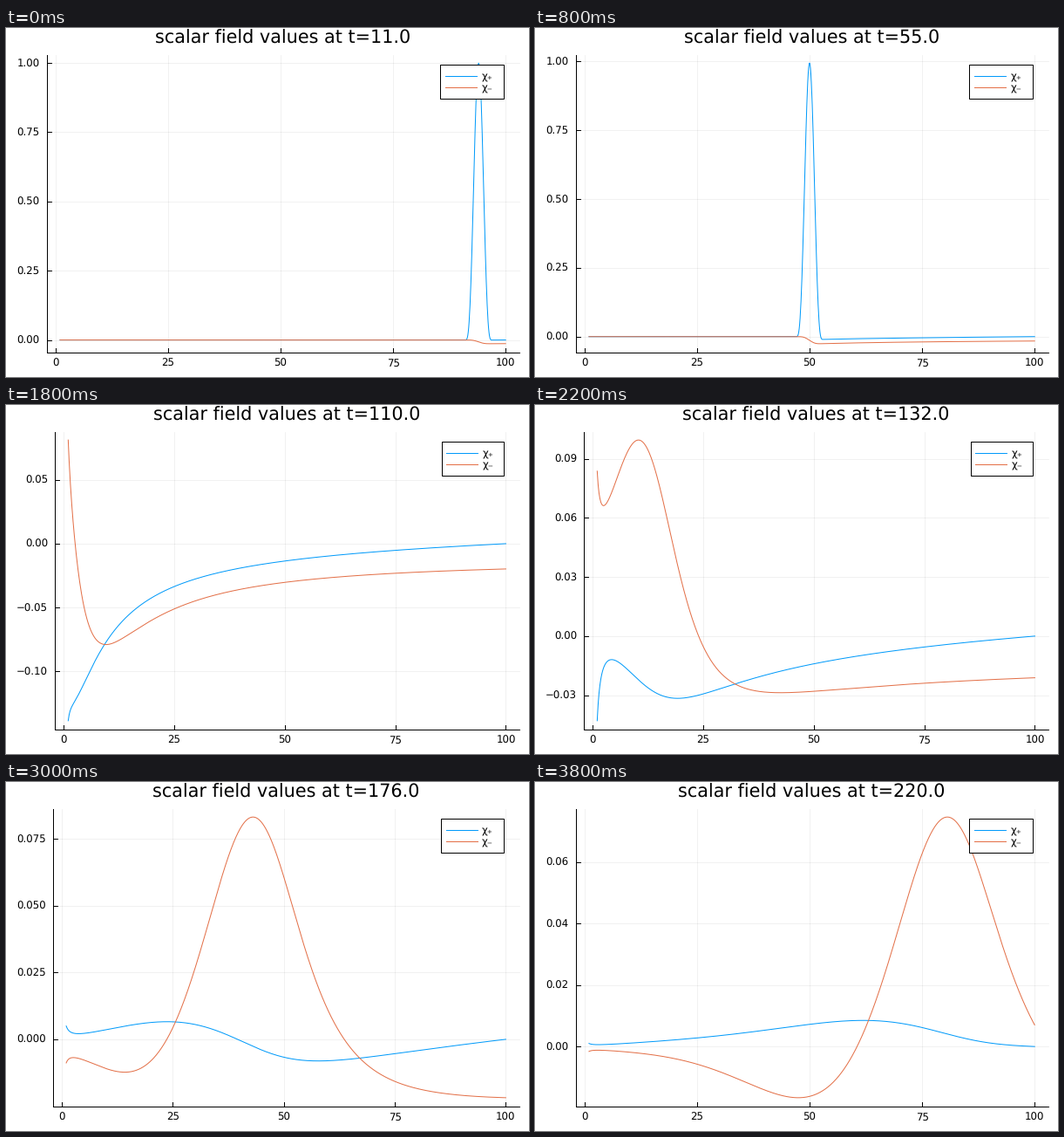
Write a matplotlib script that moves like this. It is 600 by 400 pixels and loops after 4000 ms.

```python
import math

import matplotlib.pyplot as plt
import numpy as np
from matplotlib.animation import FuncAnimation
from matplotlib.patches import Rectangle

W, H, DPI = 600, 400, 100
FRAMES, INTERVAL = 20, 200
T_STEP = 11
TOP, BOTTOM, RIGHT = 30.5, 371.5, 588.5
PAD = 0.03
BLUE = (0.0, 0.6056, 0.9787)
ORANGE = (0.8889, 0.4356, 0.2781)
PX = 72 / DPI
SMALL, LARGE = 11.8 * PX, 20.8 * PX

plt.rcParams["font.family"] = "DejaVu Sans"
plt.rcParams["text.hinting"] = "none"

# Spherical scalar wave on a black hole, marched in v = t + r.
# The enclosed mass grows outwards, from the hole to the field around it.
HOLE, CLOUD, CORE = 3.1, 2.4, 20
T_ON, T_OFF = 2, 8
R_MAX, DR, SUB = 100, 0.1, 2
r = np.linspace(1, R_MAX, 991)
soft = r ** 2 + CORE ** 2
h = HOLE / r + CLOUD * r / soft
f = 1 - h
df = HOLE / r ** 2 - CLOUD * (CORE ** 2 - r ** 2) / soft ** 2


def pulse(t):
    x = (2 * t - T_ON - T_OFF) / (T_OFF - T_ON)
    return max(0, 1 - x * x) ** 4


def incoming(v, p):
    """Ingoing field: boundary pulse plus what scatters in along constant v."""
    g = f * p / r
    area = np.zeros_like(g)
    area[1:] = np.cumsum(g[1:] + g[:-1]) * DR / 2
    return pulse(v - R_MAX) + area[-1] - area


def slope(v, p):
    dp = np.gradient(p, DR, edge_order=2)
    return -0.5 * (f * dp + incoming(v, p) / r + df * p)


def solve():
    rows = round(FRAMES * T_STEP / DR) + 1
    plus, minus = np.zeros((2, rows, r.size))
    p, dv = np.zeros_like(r), DR / SUB
    for k in range(rows):
        v = R_MAX + k * DR
        plus[k], minus[k] = incoming(v, p), (1 + h) * p
        for s in range(SUB):
            w = v + s * dv
            a = slope(w, p)
            b = slope(w + dv / 2, p + dv / 2 * a)
            c = slope(w + dv / 2, p + dv / 2 * b)
            d = slope(w + dv, p + dv * c)
            p = p + dv / 6 * (a + 2 * b + 2 * c + d)
    return plus, minus


PLUS, MINUS = solve()
COLS = np.arange(r.size)


def fields(t):
    k = np.rint((t + r - R_MAX) / DR).astype(int)
    reached = k >= 0
    k = np.maximum(k, 0)
    return PLUS[k, COLS] * reached, MINUS[k, COLS] * reached


def pick_ticks(lo, hi):
    """Best scoring round step: its tick values and decimals."""
    best = (-1, None, None)
    for e in range(-4, 1):
        for q, nice in ((1, 1), (5, 0.9), (2.5, 0.5), (2, 0.7), (3, 0.2)):
            step = q * 10.0 ** e
            first, last = math.ceil(lo / step), math.floor(hi / step)
            n = last - first + 1
            if not 4 <= n <= 8:
                continue
            score = (0.25 * (1 - abs(n - 5) / 5) + 0.25 * nice
                     + 0.5 * (hi - lo) / ((n - 1) * step))
            if score > best[0] + 1e-9:
                best = (score, step, range(first, last + 1))
    step = best[1]
    digits = next(d for d in range(8)
                  if abs(step * 10 ** d - round(step * 10 ** d)) < 1e-6)
    return [i * step for i in best[2]], digits


def label_width(s):
    return sum({".": 0.318, "−": 0.838}.get(c, 0.636) for c in s)


fig = plt.figure(figsize=(W / DPI, H / DPI), dpi=DPI, facecolor="white")
ax = fig.add_axes([0, 0, 1, 1])


def line(xs, ys, color="black", width=1.0, **kw):
    ax.plot(xs, ys, color=color, lw=width * PX, **kw)


def text(x, y, s, size=SMALL, ha="center", **kw):
    ax.text(x, y, s, fontsize=size, ha=ha, va="baseline", color="black", **kw)


def legend(left):
    d = left - 46.6
    x0 = 498 + 0.155 * d
    ax.add_patch(Rectangle((x0, 42), 570.5 - x0, 39, fc="white", ec="black",
                           lw=PX, zorder=5))
    for y, color, name in ((55.3, BLUE, "χ₊"), (68.3, ORANGE, "χ₋")):
        line([x0 + 5.5, 540.3 + 0.08 * d], [y, y], color, zorder=6)
        text(545.6 + 0.06 * d, y + 3.8, name, ha="left", zorder=6)


def draw(n):
    t = T_STEP * (n + 1)
    plus, minus = fields(t)
    lo = min(plus.min(), minus.min())
    hi = max(plus.max(), minus.max())
    pad = PAD * (hi - lo)
    lo, hi = lo - pad, hi + pad

    values, digits = pick_ticks(lo, hi)
    labels = [f"{v:.{digits}f}".replace("-", "−") for v in values]
    left = 20.9 + 11.55 * max(map(label_width, labels))

    span = R_MAX - 1
    x_lo, x_hi = 1 - PAD * span, R_MAX + PAD * span

    def px(x):
        return left + (x - x_lo) / (x_hi - x_lo) * (RIGHT - left)

    def py(y):
        return BOTTOM - (y - lo) / (hi - lo) * (BOTTOM - TOP)

    ax.cla()
    ax.set(xlim=(0, W), ylim=(H, 0))
    ax.axis("off")

    grid = dict(color=(0, 0, 0, 0.08), width=0.7, zorder=1)
    for v in range(0, 101, 25):
        x = px(v)
        line([x, x], [TOP, BOTTOM], **grid)
        line([x, x], [BOTTOM, BOTTOM - 5], zorder=2)
        text(x, 387.6, str(v))
    for v, s in zip(values, labels):
        y = py(v)
        line([left, RIGHT], [y, y], **grid)
        line([left, left + 5], [y, y], zorder=2)
        text(left - 8.2, y + 4.3, s, ha="right")
    line([left, left], [TOP, BOTTOM], zorder=2)
    line([left, RIGHT], [BOTTOM, BOTTOM], zorder=2)

    line(px(r), py(plus), BLUE, zorder=3)
    line(px(r), py(minus), ORANGE, zorder=4)
    legend(left)
    text((left + RIGHT) / 2, 18, f"scalar field values at t={t:.1f}", LARGE)
    return []


anim = FuncAnimation(fig, draw, frames=FRAMES, interval=INTERVAL, repeat=True,
                     repeat_delay=0)
plt.show()
```
